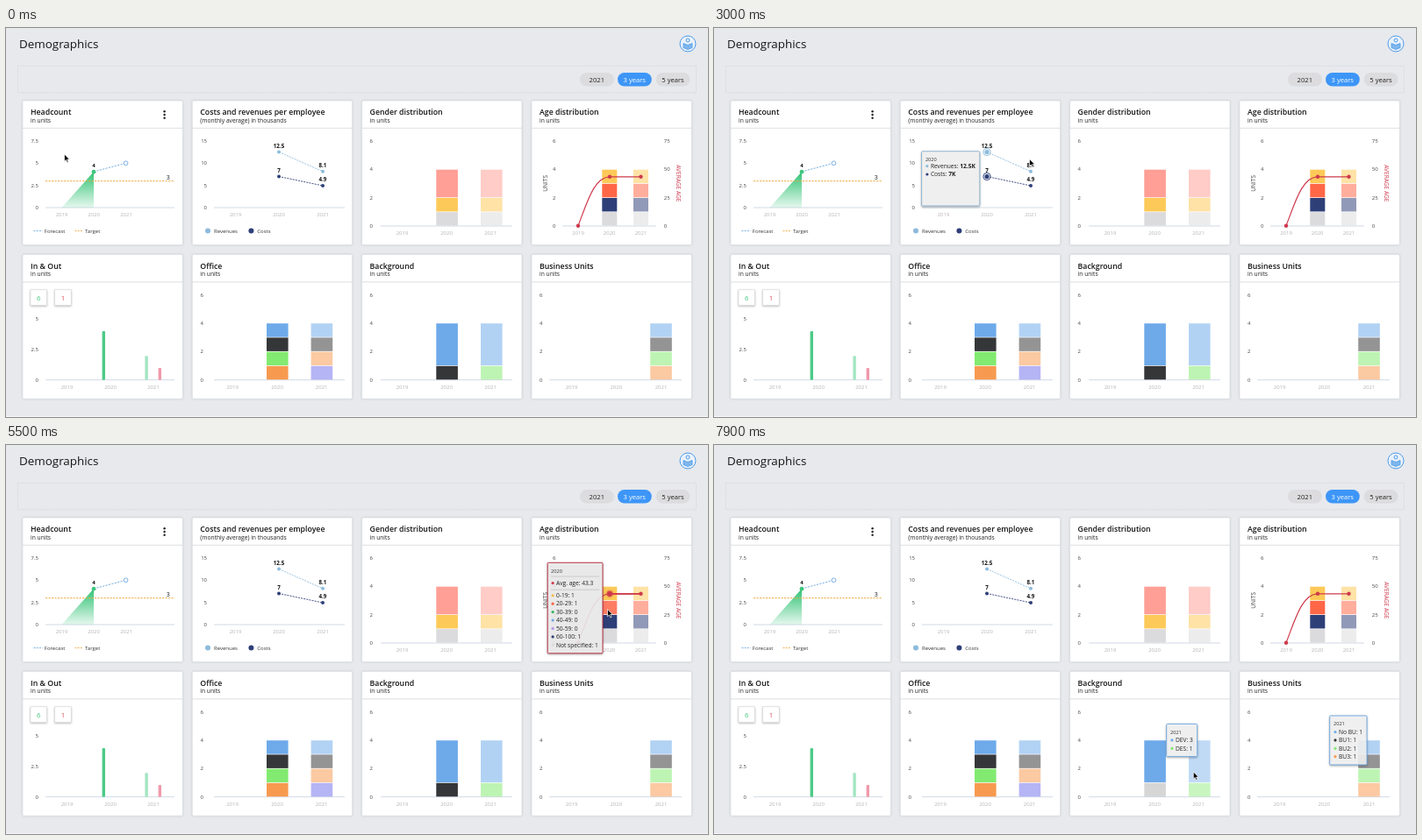
Write an HTML page that moves like this. It is 800x444 px and loops after 8000 ms.

```html
<!DOCTYPE html>
<html lang="en">
<head>
<meta charset="utf-8">
<title>Demographics</title>
<style>
html, body { margin: 0; width: 100%; height: 100%; overflow: hidden; background: #e7e9ed; }
svg { display: block; width: 800px; height: 444px; font-family: "Open Sans", sans-serif; }
.card { fill: #fff; stroke: #dcdee2; stroke-width: .7; filter: drop-shadow(0 .5px 1px #0002); }
.rule { stroke: #d4d6da; stroke-width: .8; }
.axis { stroke: #ccd6e4; stroke-width: .9; }
.tip { filter: drop-shadow(.6px 1px 1px #0005); }
.badge { fill: #fff; stroke: #d5d5d5; stroke-width: .6; filter: drop-shadow(.5px 1px 1px #0004); }
</style>
</head>
<body>
<svg id="stage" viewBox="0 0 800 444"></svg>
<script>
const BLUE = '#6eaaea', BLACK = '#353638', GREEN = '#82ea70', ORANGE = '#f79a50', LILAC = '#7472ec';
const RED = '#ff9f95', YELLOW = '#fdc958', GREY = '#dbdbdd', CORAL = '#ff6747', NAVY = '#2e3f78';
const SKY = '#8dbbdc', CRIMSON = '#cf3a4c', MINT = '#3fc67f';

const text = (x, y, s, size = 6, fill = '#333', more = '') =>
  `<text x="${x}" y="${y}" font-size="${size}" fill="${fill}" ${more}>${s}</text>`;
const mid = 'text-anchor="middle"', end = 'text-anchor="end"';
const rect = (x, y, w, h, fill, more = '') =>
  `<rect x="${x}" y="${y}" width="${w}" height="${h}" fill="${fill}" ${more}/>`;
const line = (x1, y1, x2, y2, more) => `<line x1="${x1}" y1="${y1}" x2="${x2}" y2="${y2}" ${more}/>`;
const dot = (x, y, r, fill, more = '') => `<circle cx="${x}" cy="${y}" r="${r}" fill="${fill}" ${more}/>`;
const group = (id, body, more = '') => `<g id="${id}" ${more}>${body}</g>`;
const stroke = (color, w = .9, dash = '') => `stroke="${color}" stroke-width="${w}" stroke-dasharray="${dash}"`;

function card(x, y, title, sub = 'in units') {
  return `<rect class="card" x="${x}" y="${y}" width="182.3" height="164.6" rx="1.5"/>` +
    line(x, y + 31.3, x + 182.3, y + 31.3, 'class="rule"') +
    text(x + 9, y + 15.9, title, 8.75, '#151515', 'font-weight="600"') +
    text(x + 9, y + 24.6, sub, 6.7, '#222');
}

function axes(x1, x2, y, years, labelX, top, ticks) {
  return line(x1, y, x2, y, 'class="axis"') +
    years.map((x, i) => text(x, y + 10.2, 2019 + i, 6, '#b3b3b3', mid)).join('') +
    ticks.map((s, i) => text(labelX, top + (y - top) * i / (ticks.length - 1) + 2.1, s, 6, '#444', end)).join('');
}

// Stacks [colour, count] upwards from the base; forecasts are half transparent
function stack(x, w, base, unit, parts, forecast, id) {
  let y = base;
  return parts.map(([color, n], i) => {
    y -= unit * n;
    return group(id + i, rect(x, y + .3, w, unit * n - .7, color, forecast ? 'opacity=".53"' : ''));
  }).join('');
}

function tip(id, x, y, w, h, color, year, rows, headY = 11, first = 20.5) {
  return group(id,
    `<rect class="tip" x="${x}" y="${y}" width="${w}" height="${h}" rx="1" fill="#f7f7f7" fill-opacity=".87" stroke="${color}" stroke-width="1"/>` +
    text(x + 4.3, y + headY, year, 5.6) +
    rows.map(([c, label, bold], i) => {
      const ry = y + first + i * 9.4;
      return dot(x + 6.3, ry - 2.2, 1.6, c) +
        text(x + 10.3, ry, bold ? `${label} <tspan font-weight="700">${bold}</tspan>` : label, 6.65, '#222');
    }).join(''), 'opacity="0"');
}

function halo(id, x, y, color) {
  return group(id, dot(x, y, 5, color, 'opacity=".3"') + dot(x, y, 4, '#fff', stroke(color, .8)) + dot(x, y, 2.6, color), 'opacity="0"');
}

const YEARS1 = [63.5, 100, 137], YEARS2 = [261.5, 311, 361], YEARS3 = [451.5, 502, 552], SIX = [6, 4, 2, 0];

const header = rect(0, 0, 800, 444, '#e7e9ed') + rect(0, 443, 800, 1, '#f6f7f9') +
  text(15, 23.2, 'Demographics', 13.4, '#161616') +
  dot(777, 18, 9, '#eaf1fa', stroke('#4d9ce8', 1)) +
  dot(777, 14, 2, 'none', stroke('#4d9ce8', 1)) +
  `<path d="M772 17.5l5 2 5-2v5l-5 2-5-2z" fill="#7fb6ee" ${stroke('#4d9ce8', .8)}/>` +
  rect(13.5, 43.3, 773, 30.4, 'none', stroke('#cfd1d6', .8, '1 1')) +
  [['2021', 654], ['3 years', 697], ['5 years', 740.7]].map(([s, x], i) =>
    rect(x, 51, 38.8, 15.4, i == 1 ? '#3d96f7' : '#dcdcde', 'rx="7.7"') +
    text(x + 19.3, 61.6, s, 7.6, i == 1 ? '#fff' : '#222', mid)).join('');

const headcount = card(19, 83, 'Headcount') +
  [95.2, 99, 102.8].map(y => dot(180.6, y, 1.2, '#222')).join('') +
  axes(45, 192, 205, YEARS1, 37, 129, ['7.5', '5', '2.5', '0']) +
  '<path d="M63.5 205L100 164V205z" fill="url(#fade)"/>' +
  line(45, 174.7, 192, 174.7, stroke('#f0a83c', 1, '2.2 1.3')) +
  text(184.8, 172.6, '3', 7, '#222', mid) +
  group('forecast', line(100, 164, 136.5, 154.3, stroke('#78b0e2', 1, '2.2 1.3')) +
    dot(136.5, 154.3, 2.4, '#fff', stroke('#78b0e2', 1))) +
  dot(100, 164.2, 2.4, MINT) + text(100, 159.3, '4', 6, '#111', mid + ' font-weight="700"') +
  halo('headHalo', 100, 164.2, MINT) +
  line(31.5, 231.6, 41.5, 231.6, stroke('#78b0e2', 1, '2 1.2')) + text(43.8, 233.7, 'Forecast') +
  line(78.5, 231.6, 88, 231.6, stroke('#f0b04c', 1, '2 1.2')) + text(90, 233.7, 'Target');

const SERIES = [[SKY, 141.5, 163.8, '12.5', '8.1'], [NAVY, 169.5, 180, '7', '4.9']];
const costs = card(212.3, 83, 'Costs and revenues per employee', '(monthly average) in thousands') +
  axes(237, 386, 205, YEARS2, 229, 129, [15, 10, 5, 0]) +
  SERIES.map(([c, y1, y2, a, b]) =>
    line(311, y1, 361, y2, stroke(c, .9, '2 1.2')) + dot(311, y1, 2, c) + dot(361, y2, 2, c) +
    text(311, y1 - 4.9, a, 6.2, '#111', mid + ' font-weight="700"') +
    text(361, y2 - 4.9, b, 6.2, '#111', mid + ' font-weight="700"')).join('') +
  halo('rev0', 311, 141.5, SKY) + halo('cost0', 311, 169.5, NAVY) +
  halo('rev1', 361, 163.8, SKY) + halo('cost1', 361, 180, NAVY) +
  dot(230, 231.4, 3, SKY) + text(237, 233.7, 'Revenues') + dot(279.4, 231.4, 3, NAVY) + text(286.3, 233.7, 'Costs');

const genders = [[GREY, 1], [YELLOW, 1], [RED, 2]];
const gender = card(405.6, 83, 'Gender distribution') +
  axes(427, 577, 226, YEARS3, 418, 129, SIX) +
  stack(490.3, 24.6, 226, 16.15, genders, 0, 'g') + stack(541, 24.6, 226, 16.15, genders, 1, 'h');

const ages = [[GREY, 1], [NAVY, 1], [CORAL, 1], [YELLOW, 1]];
const ageCurve = 'M652 225.7C662 200 670 169.8 688 169.8H723.5';
const age = card(599, 83, 'Age distribution') +
  axes(634, 741, 226, [652, 687.7, 723.5], 626.5, 129, SIX) +
  [75, 50, 25, 0].map((s, i) => text(749.8, 131.1 + i * 32.3, s, 6, '#444')).join('') +
  text(0, 0, 'UNITS', 6.6, '#444', mid + ' transform="translate(616.6 177.3) rotate(-90)"') +
  text(0, 0, 'AVERAGE AGE', 6.6, CRIMSON, mid + ' transform="translate(763.5 177.3) rotate(90)"') +
  stack(679.3, 17, 226, 16.15, ages, 0, 'a') + stack(715, 17, 226, 16.15, ages, 1, 'c') +
  `<path d="${ageCurve}" fill="none" ${stroke(CRIMSON, 1.2)}/>` +
  [[652, 225.7], [688, 169.8], [723.5, 169.8]].map(([x, y]) => dot(x, y, 2.2, CRIMSON)).join('') +
  group('ageHalo0', line(688, 169.8, 723.5, 169.8, stroke(CRIMSON, 1.8)) + dot(688, 169.8, 4.6, CRIMSON, 'opacity=".3"') + dot(688, 169.8, 3.1, CRIMSON), 'opacity="0"') +
  group('ageHalo1', dot(723.5, 169.8, 4.6, CRIMSON, 'opacity=".3"') + dot(723.5, 169.8, 3, CRIMSON), 'opacity="0"');

const badge = (x, s, c) => `<rect class="badge" x="${x}" y="298.8" width="18.6" height="17.8"/>` + text(x + 9.3, 310.7, s, 7.8, c, mid);
const inOut = card(19, 258.6, 'In &amp; Out') + badge(28, 6, MINT) + badge(55.6, 1, '#d9414f') +
  axes(45, 192, 401.7, [69.5, 119, 168], 37, 332, ['5', '2.5', '0']) +
  rect(109.6, 346, 3.4, 55.7, '#4cca87', 'rx="1"') + rect(158.4, 374.2, 3.4, 27.5, '#a3e5c2', 'rx="1"') +
  rect(173.6, 388, 3.4, 13.7, '#f099ab', 'rx="1"');

const office = card(212.3, 258.6, 'Office') +
  axes(237, 386, 401.7, [258, 309, 359.7], 225, 304.5, SIX) +
  stack(297, 24.6, 401.7, 16.2, [ORANGE, GREEN, BLACK, BLUE].map(c => [c, 1]), 0, 'o') +
  stack(347.6, 24.6, 401.7, 16.2, [LILAC, ORANGE, BLACK, BLUE].map(c => [c, 1]), 1, 'p');

const background = card(405.6, 258.6, 'Background') +
  axes(427, 577, 401.7, YEARS3, 418, 304.5, SIX) +
  stack(490.3, 24.6, 401.7, 16.2, [[BLACK, 1], [BLUE, 3]], 0, 'b') +
  stack(541, 24.6, 401.7, 16.2, [[GREEN, 1], [BLUE, 3]], 1, 'd');

const units = card(599, 258.6, 'Business Units') +
  axes(619, 770, 401.7, [644.7, 695.3, 746.5], 611.5, 304.5, SIX) +
  stack(734.2, 24.6, 401.7, 16.2, [ORANGE, GREEN, BLACK, BLUE].map(c => [c, 1]), 1, 'u');

const headTip = group('headTip',
  `<path class="tip" d="M71.7 130H129V156H103.5L100 160L96.5 156H71.7z" fill="#f7faf8" fill-opacity=".9" stroke="#5fc98f" stroke-width=".9"/>` +
  text(76, 141, '2020', 5.6) + dot(78, 147.3, 1.6, MINT) +
  text(81.8, 149.4, 'Headcount: <tspan font-weight="700">4</tspan>', 6.65, '#222'), 'opacity="0"');

const costRows = (a, b) => [[SKY, 'Revenues:', a], [NAVY, 'Costs:', b]];
const ageBands = [['#f5bd45', '0-19: 1'], [CORAL, '20-29: 1'], ['#37b65c', '30-39: 0'], ['#6ba4e5', '40-49: 0'],
  ['#b996ec', '50-59: 0'], [NAVY, '60-100: 1'], [GREY, 'Not specified: 1']];
const ageTip = (id, x, year) => {
  const y = 134.3;
  return group(id, `<rect class="tip" x="${x}" y="${y}" width="62.8" height="103.5" rx="1" fill="#f1f1f1" fill-opacity=".88" stroke="#b93446"/>` +
    text(x + 3.9, y + 11.2, year, 5.6) +
    [150, 165.2].map(ry => line(x + 4, ry, x + 59, ry, stroke('#b5b5b5', .6))).join('') +
    [[CRIMSON, 'Avg. age: 43.3'], ...ageBands].map(([c, s], i) => {
      const ry = i ? 164.6 + i * 9.43 : 159.9;
      return dot(x + 5.9, ry - 2.3, 1.6, c) + text(x + 9.8, ry, s, 6.65, '#222');
    }).join(''), 'opacity="0"');
};

const tips = headTip +
  tip('costTip0', 236.6, 140.8, 66.2, 62.2, '#8fb4d0', 2020, costRows('12.5K', '7K'), 10.8, 19) +
  tip('costTip1', 286.6, 149, 66.2, 62.2, '#8fb4d0', 2021, costRows('8.1K', '4.9K'), 10.8, 19) +
  tip('genderTip', 484.7, 133.5, 63, 56, '#3a5f94', 2021,
    [['#3e7fd0', 'male: 0'], ['#f97f78', 'female: 2'], [YELLOW, 'non binary: 1'], [GREY, 'Not specified: 1']], 11.4, 21) +
  ageTip('ageTip0', 617.2, 2020) + ageTip('ageTip1', 652.9, 2021) +
  tip('unitTip', 701.7, 309, 42.3, 56, '#74abe0', 2021,
    [[BLUE, 'No BU: 1'], [BLACK, 'BU1: 1'], [GREEN, 'BU2: 1'], [ORANGE, 'BU3: 1']], 11.4, 20.7) +
  tip('backTip', 515.7, 318.4, 35, 37.2, '#74abe0', 2021, [[BLUE, 'DEV: 3'], [GREEN, 'DES: 1']], 11.4, 20.7);

const cursor = group('cursor', `<path d="M0 0V8.2L1.9 6.5L3.2 9.4L4.6 8.8L3.3 6H5.9z" fill="#000" ${stroke('#fff', .7)}/>`);

const stage = document.getElementById('stage');
stage.innerHTML = `<defs><linearGradient id="fade" x2="0" y2="1"><stop stop-color="#2fc273"/><stop offset="1" stop-color="#2fc273" stop-opacity=".12"/></linearGradient></defs>` +
  header + headcount + costs + gender + age + inOut + office + background + units + tips + cursor;

// Cursor stops: time, x, y
const PATH = [
  [0, 66.5, 144], [600, 66.5, 144], [1400, 103.6, 162.5], [1800, 104, 162.6], [2300, 296, 171],
  [2600, 312, 169], [3000, 359.5, 149.5], [3400, 430, 156], [3800, 546, 176], [4100, 553, 178],
  [4600, 641.5, 169], [5100, 682, 186], [5500, 685.5, 187.5], [5900, 721, 190], [6200, 725, 205],
  [6700, 732, 372], [6900, 732.5, 378.5], [7200, 728, 380], [7700, 556, 374], [7900, 546.3, 373], [8000, 546, 373]
];

// Fades: ids, start, end, opacity while active, opacity at rest
const FADES = [
  ['headTip headHalo', 1300, 2250, 1, 0], ['forecast', 1300, 1900, .15, 1],
  ['costTip0 rev0 cost0', 2250, 3050, 1, 0], ['costTip1 rev1 cost1', 3100, 3700, 1, 0],
  ['genderTip', 3700, 4700, 1, 0], ['h0 h1 h2', 3700, 4700, .82, 1],
  ['ageTip0 ageHalo0', 4900, 5650, 1, 0], ['a2', 5000, 5700, .85, 1],
  ['ageTip1 ageHalo1', 5700, 6950, 1, 0],
  ['unitTip', 6450, 8400, 1, 0], ['u1 u0', 6500, 7250, .78, 1],
  ['backTip', 7400, 8400, 1, 0], ['b0', 7400, 8400, .2, 1], ['d0 d1', 7400, 8400, .82, 1]
].map(([ids, ...rest]) => [ids.split(' ').map(id => document.getElementById(id)), ...rest]);

const slope = (i, k) => (PATH[i + 1][k] - PATH[i][k]) / (PATH[i + 1][0] - PATH[i][0]);
function tangent(i, k) {
  if (i == 0 || i == PATH.length - 1) return 0;
  const a = slope(i - 1, k), b = slope(i, k);
  return a * b > 0 ? 2 * a * b / (a + b) : 0;
}

// Monotone cubic through the stops
function along(t, k) {
  let i = 0;
  while (i < PATH.length - 2 && t >= PATH[i + 1][0]) i++;
  const h = PATH[i + 1][0] - PATH[i][0], u = (t - PATH[i][0]) / h, v = 1 - u;
  return PATH[i][k] * (1 + 2 * u) * v * v + tangent(i, k) * h * u * v * v +
    PATH[i + 1][k] * u * u * (3 - 2 * u) - tangent(i + 1, k) * h * u * u * v;
}

const clamp = x => Math.max(0, Math.min(1, x));
const pointer = document.getElementById('cursor');

function draw(now) {
  const t = Math.floor(now % 8000 / 100) * 100;
  pointer.setAttribute('transform', `translate(${along(t, 1)} ${along(t, 2)})`);
  for (const [els, from, to, on, off] of FADES) {
    const k = clamp((t - from) / 150) * clamp((to - t) / 150 + 1);
    els.forEach(el => el.setAttribute('opacity', off + (on - off) * k));
  }
  requestAnimationFrame(draw);
}
draw(0);
</script>
</body>
</html>
```
